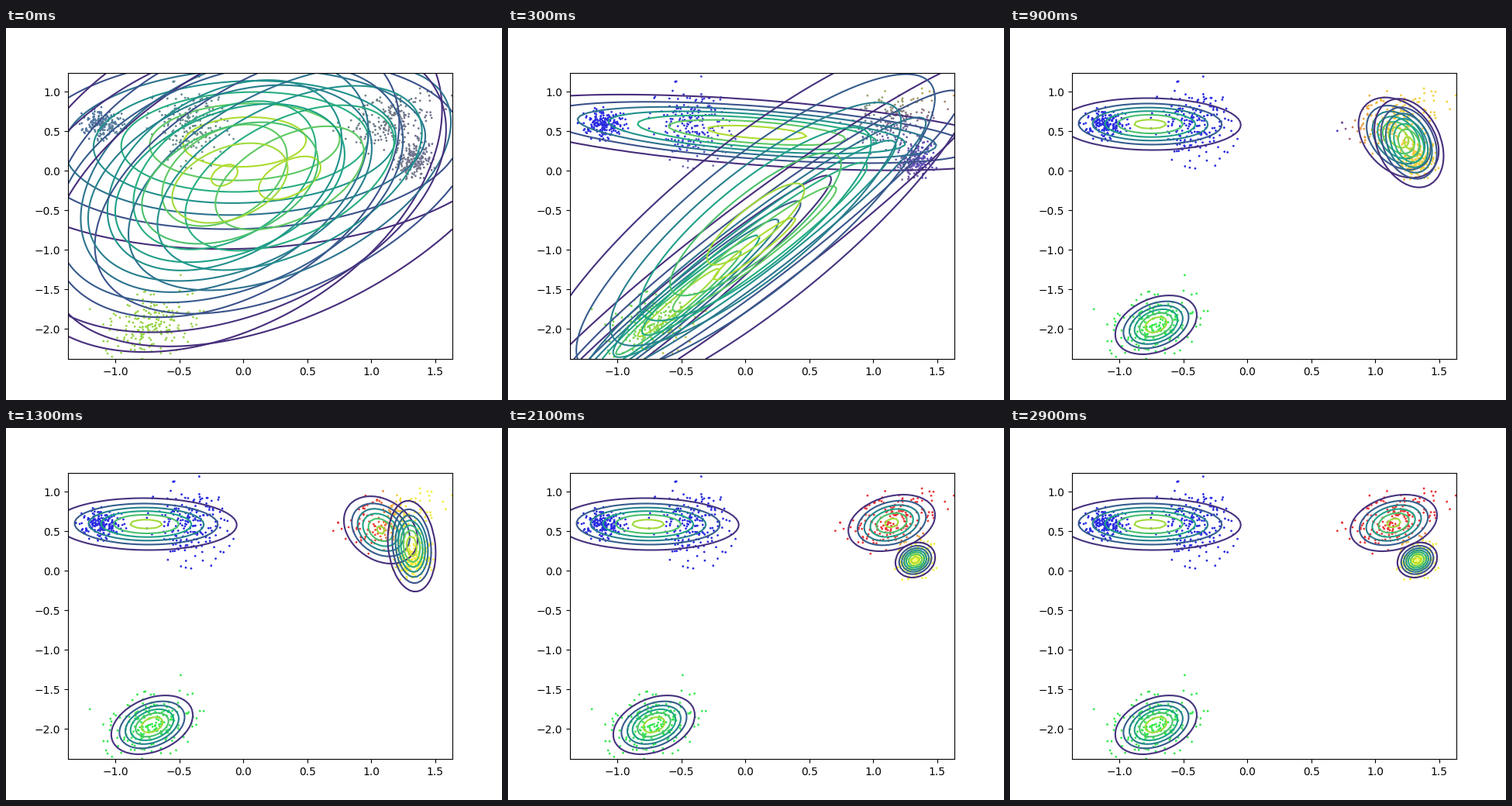
Recreate the animation shown at these times as a matplotlib script. Size 640 by 480 pixels, loop 3000 ms.

```python
import numpy as np
import matplotlib.pyplot as plt
from matplotlib.animation import FuncAnimation

FRAMES, INTERVAL = 30, 100
XLIM, YLIM = (-1.371, 1.634), (-2.381, 1.239)
PER_CLUSTER, GRID = 200, 100

# A Gaussian is (mean x, mean y, sd x, sd y, correlation).
FAR_LEFT = (-1.11, 0.59, 0.080, 0.085, 0.0)
MID_LEFT = (-0.41, 0.588, 0.140, 0.225, -0.1)
BOTTOM = (-0.714, -1.948, 0.162, 0.189, 0.33)
RIGHT = (1.144, 0.603, 0.1766, 0.186, 0.27)
TIGHT = (1.3285, 0.135, 0.0766, 0.1093, 0.15)
CLUSTERS = [FAR_LEFT, MID_LEFT, BOTTOM, RIGHT, TIGHT]
OUTLIERS = [(1.63, 0.95), (-0.49, -1.32), (-1.2, -1.75), (-0.345, 1.19)]


def merge(a, b):
    """Gaussian with the joint mean and covariance of two equal clusters."""
    mx, my = (a[0] + b[0]) / 2, (a[1] + b[1]) / 2
    hx, hy = (a[0] - b[0]) / 2, (a[1] - b[1]) / 2
    sx = np.sqrt((a[2]**2 + b[2]**2) / 2 + hx**2)
    sy = np.sqrt((a[3]**2 + b[3]**2) / 2 + hy**2)
    cov = (a[2] * a[3] * a[4] + b[2] * b[3] * b[4]) / 2 + hx * hy
    return mx, my, sx, sy, cov / (sx * sy)


TOP_LEFT = merge(FAR_LEFT, MID_LEFT)
ALL_RIGHT = merge(RIGHT, TIGHT)
STRETCHED = (0.09, 0.483, 1.035, 0.238, -0.51)

# Each component travels through (step, Gaussian) and settles on its data.
BLUE = [(0, (0.01, 0.363, 1.02, 0.667, 0.08)),
        (3, STRETCHED), (5, STRETCHED), (9, TOP_LEFT)]
GREEN = [(0, (-0.147, -0.058, 0.86, 1.13, 0.37)),
         (3, (-0.524, -1.67, 0.608, 0.819, 0.973)), (5, BOTTOM)]
RED = [(0, (0.362, -0.092, 0.95, 1.07, 0.50)),
       (3, (0.071, -0.988, 1.0, 1.24, 0.957)),
       (5, (0.847, 0.128, 0.737, 0.985, 0.96)),
       (7, ALL_RIGHT),
       (13, (1.074, 0.515, 0.151, 0.223, -0.28)), (19, RIGHT)]
YELLOW = [(0, (-0.105, -0.156, 0.86, 0.96, 0.36)),
          (3, (0.08, -0.675, 0.91, 1.23, 0.84)),
          (5, (1.06, 0.42, 0.42, 0.55, 0.90)),
          (7, ALL_RIGHT),
          (13, (1.316, 0.3095, 0.0916, 0.2837, -0.15)), (19, TIGHT)]
TRACKS = [BLUE, GREEN, RED, YELLOW]
WEIGHTS = [0.30, 0.25, 0.08, 0.25]
COLORS = np.array([(0.16, 0.17, 0.88), (0.20, 0.91, 0.30),
                   (0.92, 0.20, 0.20), (0.96, 0.96, 0.25)])


def make_points():
    rng = np.random.default_rng(4)
    parts = [np.array(OUTLIERS).T]
    for mx, my, sx, sy, rho in CLUSTERS:
        u, v = rng.standard_normal((2, PER_CLUSTER))
        shrink = np.minimum(1, 2.5 / np.hypot(u, v))
        u, v = u * shrink, v * shrink
        parts.append([mx + sx * u,
                      my + sy * (rho * u + np.sqrt(1 - rho**2) * v)])
    return np.hstack(parts)


def gaussian_at(track, step):
    """Interpolate means linearly, spreads in logs, correlation in atanh."""
    steps, stops = zip(*track)
    mx, my, sx, sy, rho = np.array(stops).T

    def at(values):
        return np.interp(step, steps, values)

    return (at(mx), at(my), np.exp(at(np.log(sx))),
            np.exp(at(np.log(sy))), np.tanh(at(np.arctanh(rho))))


def density(x, y, mx, my, sx, sy, rho):
    u, v, q = (x - mx) / sx, (y - my) / sy, 1 - rho**2
    dist = (u * u - 2 * rho * u * v + v * v) / q
    # the floor keeps the zero level from being outlined
    return np.exp(-dist / 2) / (2 * np.pi * sx * sy * np.sqrt(q)) + 1e-200


def point_colors(step):
    share = np.array([w * density(px, py, *gaussian_at(track, step))
                      for w, track in zip(WEIGHTS, TRACKS)])
    share /= share.sum(axis=0)
    return np.clip(share.T @ COLORS, 0, 1)


px, py = make_points()
gx, gy = np.meshgrid(np.linspace(*XLIM, GRID), np.linspace(*YLIM, GRID))

fig, ax = plt.subplots(figsize=(6.4, 4.8), dpi=100)
dots = ax.scatter(px, py, s=4, linewidths=0)
contours = []


def draw(step):
    while contours:
        contours.pop().remove()
    # memberships come from the components of the previous step
    dots.set_facecolor(point_colors(max(step - 1, 0)))
    for track in TRACKS:
        z = density(gx, gy, *gaussian_at(track, step))
        contours.append(ax.contour(gx, gy, z))
    ax.set(xlim=XLIM, ylim=YLIM)
    return [dots]


anim = FuncAnimation(fig, draw, frames=FRAMES, interval=INTERVAL,
                     repeat=True, repeat_delay=0, blit=False)
plt.show()
```
